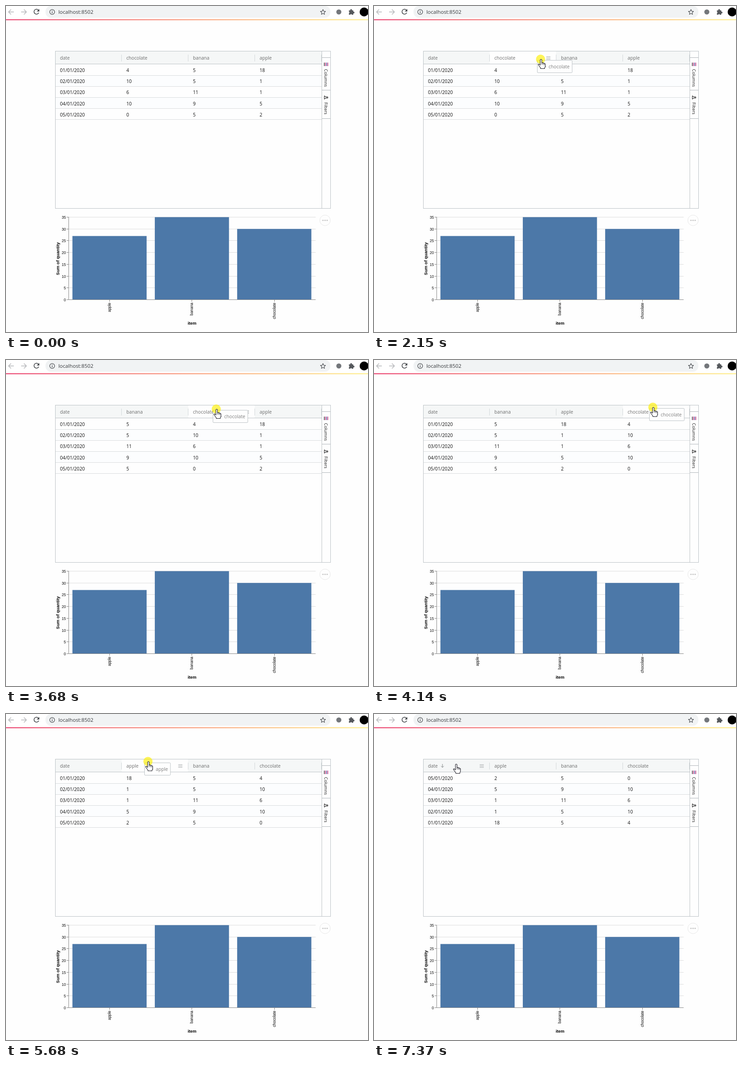
These frames come from a looping animation (788x711 px, 8000 ms). An HTML page with a canvas:

```html
<!DOCTYPE html>
<html lang="en">
<head>
<meta charset="utf-8">
<title>Grid with draggable columns</title>
<style>
  html, body { margin: 0; width: 100%; height: 100%; overflow: hidden; background: #fefefe; }
  canvas { display: block; }
</style>
</head>
<body>
<canvas id="stage" width="788" height="711"></canvas>
<script>
const ctx = document.getElementById('stage').getContext('2d');
const LOOP = 8000, START = 440, TICK = 76.9;
const UI = '"Open Sans", sans-serif', CHART = '"Liberation Sans", Arial, sans-serif';
const BORDER = '#bdc3c7', COL = 145;

const dates = [1, 2, 3, 4, 5].map(d => `0${d}/01/2020`);
const columns = {
  date: dates,
  chocolate: [4, 10, 6, 10, 0],
  banana: [5, 5, 11, 9, 5],
  apple: [18, 1, 1, 5, 2],
};

// Pointer path: time, x, y
const path = [
  [440, 718, 585], [520, 640, 420], [600, 570, 293], [755, 570, 293],
  [1060, 500, 218], [1286, 431, 152], [1440, 388, 126], [1590, 347, 119],
  [1670, 345, 119], [1820, 344, 119], [1970, 344, 116], [2130, 362, 116],
  [2290, 412, 116], [2440, 448, 118], [2520, 450, 120], [2920, 451, 120],
  [3290, 453, 112], [3450, 454, 107], [3750, 459, 107], [3830, 482, 105],
  [4000, 575, 103], [4131, 607, 103], [4220, 608, 103], [4440, 520, 112],
  [4590, 461, 119], [4750, 461, 119], [5050, 453, 107], [5200, 440, 104],
  [5430, 375, 103], [5590, 313, 103.5], [5669, 309, 103.5], [5820, 309, 104],
  [6440, 178, 109],
];
// Mouse held down: from, to, dragged column
const presses = [
  [1960, 2490, 'chocolate'], [3430, 4260, 'chocolate'], [5040, 5820, 'apple'],
  [6510, 6660], [7270, 7350],
];

const ARROW = new Path2D('M0 0V14L3.2 11 5.6 16.6 8 15.6 5.7 10.2H10Z');
const HAND = new Path2D('M-1.7 12V2a1.7 1.7 0 0 1 3.4 0V8q2-1 2.8.6 2-.7 2.6.8 2-.4 2.2 1.6V15q0 2-1.4 4V20.5H-1V19Q-3 16-5.5 13q-1.3-2 .4-2.4 1.6 0 3.4 2.4Z');

function rect(x, y, w, h, color) {
  ctx.fillStyle = color;
  ctx.fillRect(x, y, w, h);
}

function text(str, x, y, size, color, { font = UI, weight = 400, align = 'left', turn = 0 } = {}) {
  ctx.save();
  ctx.translate(x, y);
  ctx.rotate(turn * Math.PI / 2);
  ctx.font = `${weight} ${size}px ${font}`;
  ctx.textAlign = align;
  ctx.fillStyle = color;
  ctx.fillText(str, 0, 0);
  ctx.restore();
}

function shape(d, { fill, stroke, width = 1, x = 0, y = 0 }) {
  const p = d instanceof Path2D ? d : new Path2D(d);
  ctx.save();
  ctx.translate(x, y);
  ctx.lineWidth = width;
  ctx.lineJoin = 'round';
  if (fill) { ctx.fillStyle = fill; ctx.fill(p); }
  if (stroke) { ctx.strokeStyle = stroke; ctx.stroke(p); }
  ctx.restore();
}

function circle(x, y, r, style) {
  const p = new Path2D();
  p.arc(x, y, r, 0, 7);
  shape(p, style);
}

function slide(t, from) {
  const u = Math.min(1, Math.max(0, (t - from) / 220));
  return u * u * (3 - 2 * u);
}

function pointerAt(t) {
  const i = path.findIndex(p => p[0] > t);
  if (i < 0) return path[path.length - 1].slice(1);
  if (i === 0) return path[0].slice(1);
  const [t0, x0, y0] = path[i - 1], [t1, x1, y1] = path[i];
  const u = (t - t0) / (t1 - t0);
  return [x0 + (x1 - x0) * u, y0 + (y1 - y0) * u];
}

function drawBrowser() {
  rect(0, 0, 788, 27, '#fff');
  ctx.beginPath();
  ctx.roundRect(86, 0, 620, 25.5, 12);
  ctx.fillStyle = '#f1f3f4';
  ctx.fill();
  shape('M17 13H6M11 7.5L5.5 13 11 18.5M33 13H44M39 7.5L44.5 13 39 18.5', { stroke: '#b4b6b9', width: 1.4 });
  shape('M71 9.5A5.4 5.4 0 1 0 71.4 14.5', { stroke: '#45484c', width: 1.6 });
  shape('M72.5 6.5V12H67Z', { fill: '#45484c' });
  circle(100.5, 13, 5.3, { stroke: '#55585c', width: 1.3 });
  rect(99.8, 12, 1.4, 4, '#55585c');
  rect(99.8, 9.6, 1.4, 1.4, '#55585c');
  text('localhost:8502', 114, 17, 11.3, '#36393d');
  shape('M690 7.6L691.6 11.3 695.6 11.7 692.6 14.3 693.5 18.3 690 16.2 686.5 18.3 687.4 14.3 684.4 11.7 688.4 11.3Z', { stroke: '#55585c', width: 1.2 });
  circle(724.5, 13, 5.5, { fill: '#74777b' });
  shape('M746.5 9.5H749.5A1.9 1.9 0 1 1 753 9.5H756V12.5A1.9 1.9 0 1 1 756 16V19H752.8A1.8 1.8 0 0 0 749.4 19H746.5V15.8A1.8 1.8 0 0 0 746.5 12.4Z', { fill: '#55585c' });
  circle(779.5, 13, 9.7, { fill: '#000' });
  const band = ctx.createLinearGradient(0, 0, 788, 0);
  band.addColorStop(0, '#ea3c6c');
  band.addColorStop(.5, '#f99878');
  band.addColorStop(1, '#fff08a');
  rect(0, 29, 788, 2, band);
}

function drawSidebar() {
  rect(688, 99, 18, 342, '#fefefe');
  rect(687, 98, 1, 344, BORDER);
  for (const y of [112, 183, 245]) rect(688, y, 18, 1, '#b0b6ba');
  ['#444', '#c2307a', '#4a4f9a', '#c2307a'].forEach((c, i) => rect(692 + i * 2.6, 123.5, 1.4, 7.5, c));
  text('Columns', 693, 137.5, 9.4, '#181818', { turn: 1 });
  shape('M693 196V203L696.5 200.6H700.5V198.4H696.5Z', { stroke: '#222', width: 1.1 });
  text('Filters', 693, 210, 9.4, '#181818', { turn: 1 });
}

function drawGrid(t, [px, py], press) {
  const s1 = slide(t, 2250), s2 = slide(t, 3900), s3 = slide(t, 5400);
  const slots = { date: 0, chocolate: 1 + s1 + s2, banana: 2 - s1 + s3, apple: 3 - s2 - s3 };
  const dragged = press && press[2];
  const descending = t >= 7350;

  rect(107, 98, 600, 344, BORDER);
  rect(108, 99, 598, 342, '#fefefe');
  rect(108, 99, 579, 27, '#f5f7f7');
  rect(108, 126, 579, 1, BORDER);

  const hovered = t >= START && px > 107 && px < 687 ? Math.floor((py - 127) / 24.2) : -1;
  for (let r = 0; r < 5; r++) {
    const top = r ? 128 + r * 24 : 127;
    const height = 151 + r * 24 - top;
    rect(108, top, 579, height, r === hovered ? '#ecf0f1' : r % 2 ? '#fcfdfe' : '#fefefe');
    rect(108, 151 + r * 24, 579, 1, '#d9dcde');
  }
  for (let i = 1; i < 5; i++) rect(Math.min(106 + i * COL, 687), 106, 1, 15, '#d3d8da');

  if (dragged) rect(107 + slots[dragged] * COL, 99, COL - 1, 27, '#fefefe');
  for (const name in columns) {
    const x = 117.5 + slots[name] * COL - (slots[name] ? .5 : 0);
    text(name, x, 117, 10.2, 'rgba(0,0,0,.56)');
    columns[name].forEach((value, r) => {
      const row = descending ? 4 - r : r;
      text(value, x, 144 + row * 24.2, 10.2, '#111');
    });
  }

  if (t >= 6660) {
    shape(descending ? 'M149 109V116.5M146 113.5L149 116.5 152 113.5' : 'M149 117V109.5M146 112.5L149 109.5 152 112.5', { stroke: '#7d8182' });
  }
  if (t >= START && py < 126 && !(t > 2490 && t < 2740)) {
    const slot = dragged ? slots[dragged] : Math.floor((px - 107) / COL);
    const tone = t >= 2740 && t < 2820 ? '#d0d3d3' : '#a4a8aa';
    for (let i = 0; i < 3; i++) rect(230 + slot * COL, 110 + i * 3, 9, 1, tone);
  }
}

function drawChart() {
  const bottom = 640.5, unit = 180 / 35;
  for (let v = 0; v <= 35; v += 5) {
    const y = Math.round(bottom - v * unit - .5);
    rect(136, y, 538, 1, '#ddd');
    rect(132, y, 4, 1, '#888');
    text(v, 130.5, y + 3.5, 8.4, '#111', { font: CHART, align: 'right' });
  }
  [['apple', 27], ['banana', 35], ['chocolate', 30]].forEach(([name, sum], i) => {
    const x = 144.6 + i * 179.3;
    rect(x, bottom - sum * unit, 161.5, sum * unit, '#4c78a8');
    rect(Math.round(x + 80.3), 641, 1, 4, '#888');
    text(name, x + 83.5, 647, 8.4, '#000', { font: CHART, align: 'right', turn: -1 });
  });
  rect(136, 460, 1, 181, '#888');
  rect(136, 640, 538, 1, '#888');
  text('Sum of quantity', 115.5, 551, 9.5, '#000', { font: CHART, weight: 700, align: 'center', turn: -1 });
  text('item', 405, 694.5, 9.3, '#000', { font: CHART, weight: 700, align: 'center' });
  circle(694.5, 467.5, 11.5, { fill: '#fefefe', stroke: '#e8e8e8' });
  for (const dx of [-4.5, 0, 4.5]) circle(694.5 + dx, 467.5, 1.6, { fill: '#c8c8c8' });
}

function drawGhost(name, x, y) {
  ctx.font = `400 10.2px ${UI}`;
  const left = Math.round(x - 8) + .5, top = Math.round(y + 2) + .5;
  ctx.beginPath();
  ctx.roundRect(left, top, ctx.measureText(name).width + 30, 27, 1.5);
  ctx.fillStyle = '#fefefe';
  ctx.fill();
  ctx.strokeStyle = BORDER;
  ctx.lineWidth = 1;
  ctx.stroke();
  shape('M-4 0H4M0-4V4', { stroke: '#888', x: left + 15, y: top + 14 });
  text(name, left + 24.5, top + 17.5, 10.2, 'rgba(0,0,0,.5)');
}

function drawPointer(t, [x, y], press) {
  if (press) {
    if (press[2] && t > press[0] + 100) drawGhost(press[2], x, y);
    circle(x, y, 10, { fill: 'rgba(252,238,0,.65)' });
  }
  const hand = y < 126;
  shape(hand ? HAND : ARROW, { x: hand ? x + 1 : x, y, fill: '#fff', stroke: '#1a1a24', width: 1.1 });
  if (hand) shape('M1.7 8V12M4.5 9V12.5M7.1 10V13', { x: x + 1, y, stroke: '#1a1a24', width: .8 });
}

function render(now) {
  const time = now % LOOP;
  const t = START + Math.floor((time - START) / TICK) * TICK;
  const pointer = pointerAt(t);
  const press = presses.find(([from, to]) => t >= from && t < to);
  rect(0, 0, 788, 711, '#fefefe');
  drawBrowser();
  drawGrid(t, pointer, press);
  drawSidebar();
  drawChart();
  if (t >= START) drawPointer(t, pointer, press);
}

const begin = performance.now();
(function loop() {
  render(performance.now() - begin);
  requestAnimationFrame(loop);
})();
</script>
</body>
</html>
```
